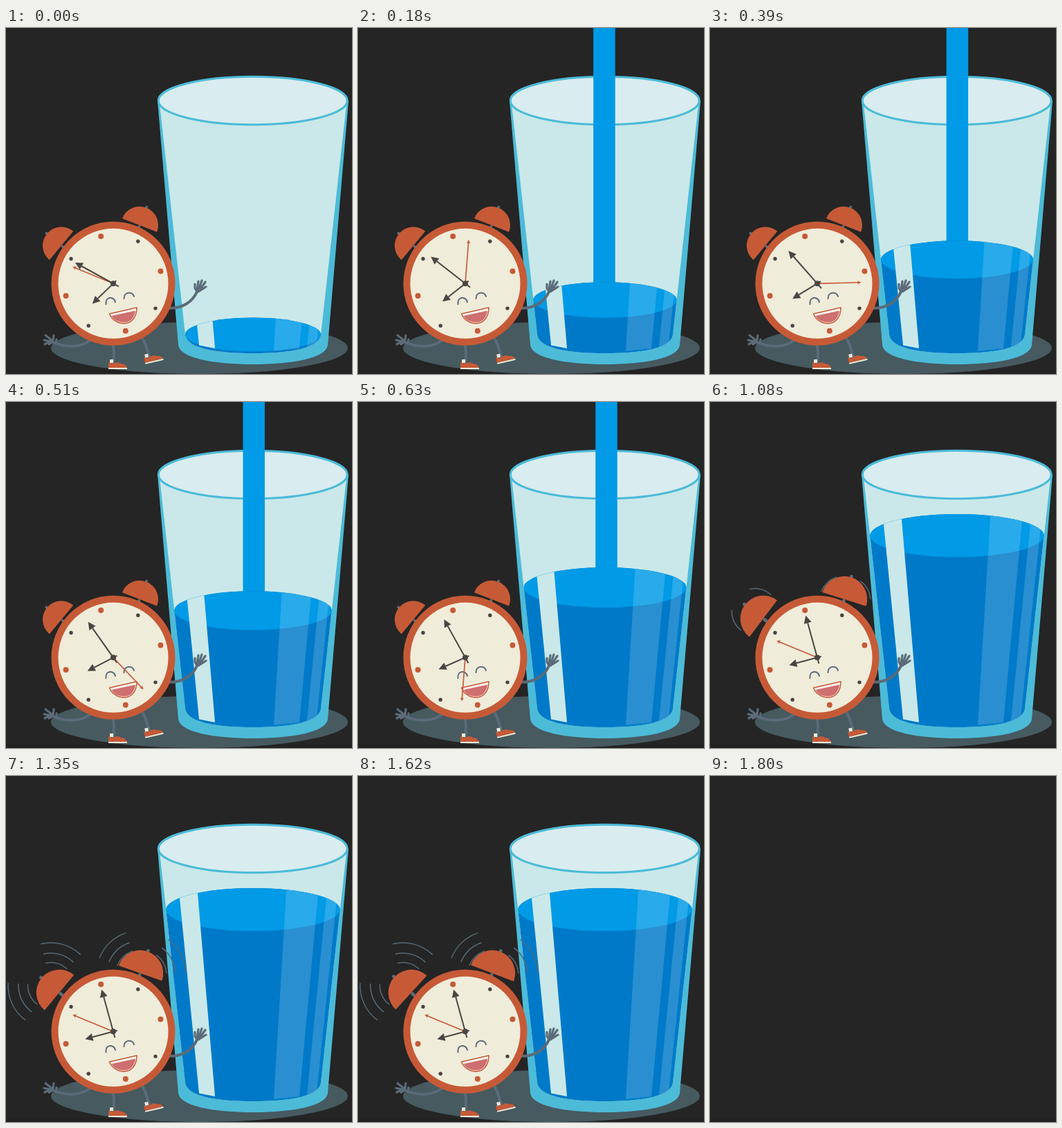
These frames come from a looping animation (500 by 500 pixels, 1830 ms). An HTML page:

```html
<!DOCTYPE html>
<html lang="en">
<head>
<meta charset="utf-8">
<title>Clock and glass</title>
<style>
html, body { margin: 0; width: 100%; height: 100%; overflow: hidden; background: #252525; }
svg { display: block; width: 100vw; height: 100vh; }
.limb { fill: none; stroke: #5b6b79; stroke-width: 4; stroke-linecap: round; }
.thin { fill: none; stroke: #5b6b79; stroke-width: 2; stroke-linecap: round; }
.finger { fill: none; stroke: #5b6b79; stroke-width: 3.2; stroke-linecap: round; stroke-linejoin: round; }
.wave { fill: none; stroke: #566975; stroke-width: 1.5; stroke-linecap: round; }
.red { fill: #c65a37; }
</style>
</head>
<body>
<svg viewBox="0 0 500 500">
  <defs>
    <clipPath id="inWater"><path id="waterClip"/></clipPath>
    <g id="shoe">
      <path fill="#f0ecda" d="M2 -8h5v5h-5z"/>
      <path class="red" d="M0 -4Q4 -1 9 -3Q15 -5 18 -2Q26 -1 27 4H0Z"/>
      <path fill="#f0ecda" d="M0 4H27V6H0Z"/>
    </g>
  </defs>
  <rect width="500" height="500" fill="#252525"/>
  <rect y="495" width="500" height="5" fill="#232122"/>
  <g id="scene">
    <ellipse cx="279.5" cy="462.5" rx="214.5" ry="37.5" fill="#465a60"/>

    <path fill="#4cbbd8" d="M219 105L249 458C251 477 300 486 357 486S463 477 465 458L495 105Z"/>
    <path fill="#cae8e9" d="M222 110L259 443C261 462 300 470 357 470S453 462 455 443L492 110Z"/>
    <ellipse cx="356.7" cy="105" rx="136.5" ry="34.7" fill="#d9ecef" stroke="#4cbbd8" stroke-width="3"/>
    <rect id="stream" width="31.5" fill="#009ae6"/>
    <path id="water" fill="#007ac8"/>
    <ellipse id="surface" cx="357" fill="#009ae6"/>
    <g clip-path="url(#inWater)">
      <path fill="#cae8e9" d="M248.3 150L275.3 150L302 463L279 458.5Z"/>
      <path fill="#fff" opacity=".16" d="M406 150L453 150L424 463L387 467ZM465.5 150L481 150L449 457L435 461Z"/>
    </g>

    <path class="limb" d="M154.500 457C157 467 156 476 155 483M196 447C204 457 202 464 207 473"/>
    <use href="#shoe" x="148" y="487"/>
    <use href="#shoe" transform="translate(200 480) rotate(-13)"/>
    <path class="limb" d="M122 451C108 462 88 462 70 455M236 404.500C255 406 270 395 276 381"/>
    <path class="finger" d="M72 456L65 452L56 457M65 453L55 451M66 451L57 444M68 452L69 444M72 456L73 450M66 455L62 457"/>
    <path class="finger" d="M276 381L273 376L273 370M276 379L278 366M278 379L283 365M279 380L288 367M278 381L289 374"/>
    <g id="bells"></g>
    <circle cx="155" cy="369.300" r="84.500" fill="#f0ecda" stroke="#c65a37" stroke-width="10"/>
    <g id="dots"></g>
    <path class="thin" d="M144.500 399C143 388 156 387 158 396M170.500 391C170 381 183 380 185 388"/>
    <path fill="#fbf6ee" stroke="#c65a37" stroke-width="1.500" stroke-linejoin="round" d="M149.500 413L189 404C189 418 181 427 171 427C160 427 152 420 149.500 413Z"/>
    <path fill="#cf6f6f" d="M152.500 416L187 408.500C186 419 179 425.500 171 425.500C162 425.500 155 421 152.500 416Z"/>
    <g id="hands" transform="translate(155 369.300)"></g>
  </g>
</svg>
<script>
const LOOP = 1830, STEP = 30, POUR = 900;
const $ = id => document.getElementById(id);
const clamp = v => Math.max(0, Math.min(1, v));
const ramp = (t, from, to) => clamp((t - from) / (to - from));
const lerp = (a, b, k) => a + (b - a) * k;

function add(parent, name, attrs) {
  const node = document.createElementNS('http://www.w3.org/2000/svg', name);
  set(node, attrs);
  return parent.appendChild(node);
}
function set(node, attrs) {
  for (const key in attrs) node.setAttribute(key, attrs[key]);
}
// Point at an angle in degrees clockwise from straight up.
function polar(x, y, r, deg) {
  const a = deg * Math.PI / 180;
  return [x + r * Math.sin(a), y - r * Math.cos(a)];
}
function arc(x, y, r, from, to) {
  return `M${polar(x, y, r, from)}A${r} ${r} 0 0 1 ${polar(x, y, r, to)}`;
}

for (let i = 0; i < 8; i++) {
  const [cx, cy] = polar(155, 369.3, 70.7, -14.6 + 45 * i);
  add($('dots'), 'circle', { cx, cy, r: i % 2 ? 2.7 : 4, fill: i % 2 ? '#4a4542' : '#c65a37' });
}

function makeBell() {
  const bell = add($('bells'), 'g', {});
  add(bell, 'path', { class: 'limb', d: 'M0 -26V-28M0 2V4', 'stroke-width': 5 });
  add(bell, 'path', { class: 'red', d: 'M-27 0A27 27 0 0 1 27 0Z' });
  return bell;
}
const leftBell = makeBell(), rightBell = makeBell();

function makeWaves(x, y, axis, near, far, radii) {
  return radii.map(r => add($('scene'), 'path', {
    class: 'wave',
    d: arc(x, y, r, axis - far, axis - near) + arc(x, y, r, axis + near, axis + far)
  }));
}
const waves = [
  makeWaves(65, 303, -50, 37, 93, [33.5, 47, 62]),
  makeWaves(195, 288, 9, 29, 76, [37, 50, 65])
];

function makeHand(length, tail, head, width, color) {
  const hand = add($('hands'), 'g', {});
  add(hand, 'path', { d: `M0 ${tail}V${head - length}`, stroke: color, 'stroke-width': width });
  add(hand, 'path', { d: `M0 ${-length}L${head / 2} ${head - length}H${-head / 2}Z`, fill: color });
  return hand;
}
const secondHand = makeHand(63.5, 0, 5, 1.7, '#c65a37');
const hourHand = makeHand(42, 6, 11, 2, '#4a4542');
const minuteHand = makeHand(63, 9, 11, 2, '#4a4542');
add($('hands'), 'circle', { r: 4, fill: '#4a4542' });

function turn(hand, deg) {
  set(hand, { transform: `rotate(${deg})` });
}
function placeBell(bell, x, y, deg, scale) {
  set(bell, { transform: `translate(${x} ${y}) rotate(${deg}) scale(${scale})` });
}

function draw(t) {
  const pour = clamp(t / POUR);

  const y = lerp(443, 193, pour), rx = lerp(98, 125.7, pour), ry = lerp(24.5, 31, pour);
  const shape = `M${357 - rx} ${y}L259 443C261 462 300 470 357 470S453 462 455 443` +
    `L${357 + rx} ${y}A${rx} ${ry} 0 0 0 ${357 - rx} ${y}Z`;
  set($('water'), { d: shape });
  set($('waterClip'), { d: shape });
  set($('surface'), { cy: y, rx, ry });
  set($('stream'), {
    x: Math.min(343.2, 341.6 + (t - 390) * 0.007),
    height: (y - ry + 3) * ramp(t, 0, 120),
    opacity: 1 - ramp(t, 690, 840)
  });

  turn(minuteHand, lerp(-61.2, -15.4, pour));
  turn(hourHand, lerp(226, 255, pour));
  turn(secondHand, 292.5 + 360 * pour);

  const ring = ramp(t, 900, 1020);
  const shake = -Math.cos((t - 1080) / 120 * 2 * Math.PI);
  const scale = 1 + 0.23 * ring;
  placeBell(leftBell, 80 - 3 * ring, 314.5 - 1.5 * ring, -50.3 + ring * 2.7 * shake, scale);
  placeBell(rightBell, 193 + ring, 285, 21.4 + ring * (1.6 * shake - 2.2), scale);
  for (const side of waves) {
    side.forEach((wave, i) => set(wave, { opacity: ramp(t, 1020 + 100 * i, 1080 + 100 * i) }));
  }

  set($('scene'), { opacity: 1 - ramp(t, 1620, 1800) });
}

const start = performance.now();
function tick() {
  const t = (performance.now() - start) % LOOP;
  draw(Math.floor(t / STEP) * STEP);
  requestAnimationFrame(tick);
}
tick();
</script>
</body>
</html>
```
